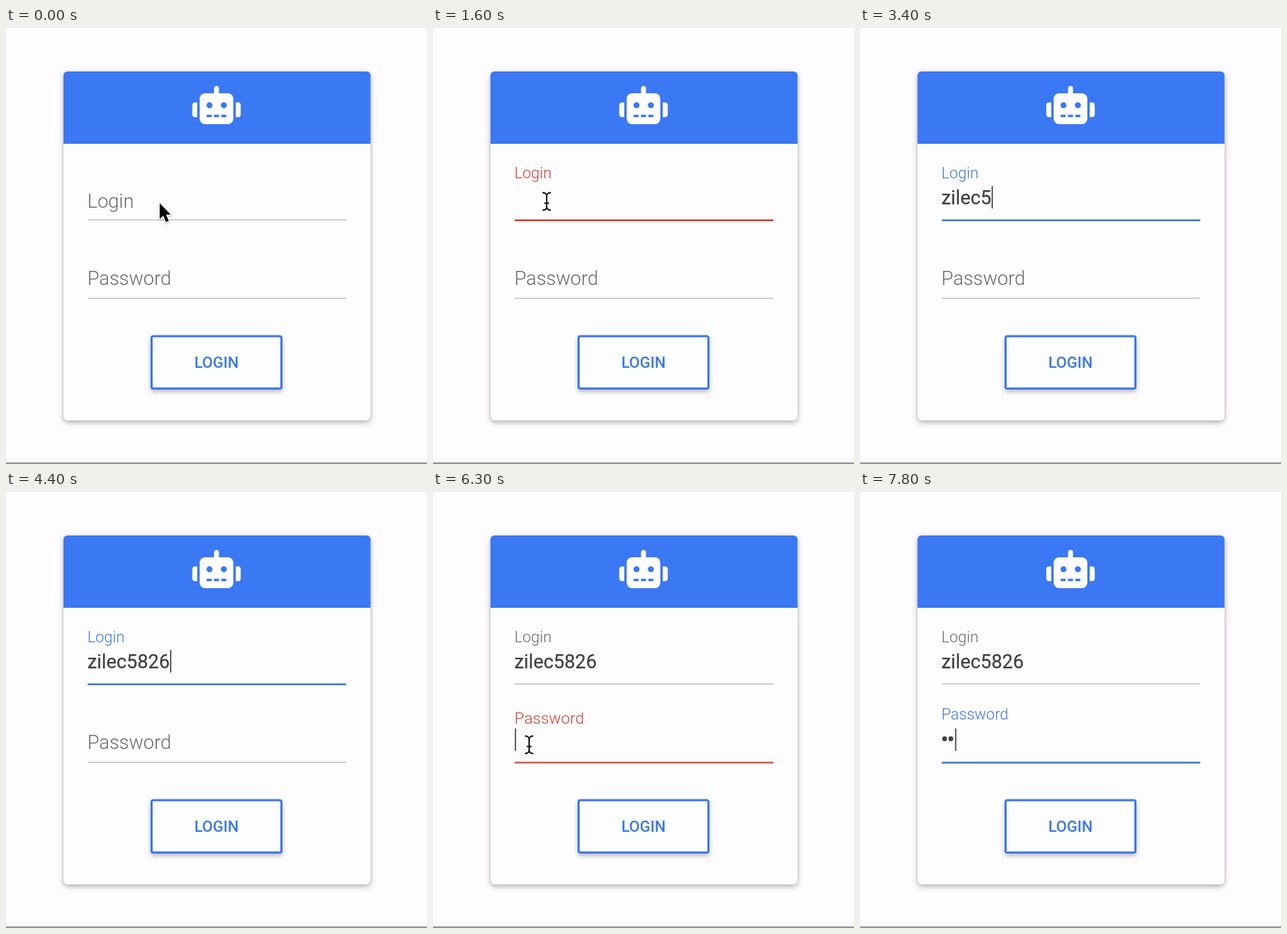
These frames come from a looping animation (600 px wide and 621 px high, 8 s). An HTML page:

```html
<!DOCTYPE html>
<html lang="en">
<head>
<meta charset="utf-8">
<title>Login form</title>
<style>
  html, body { margin: 0; width: 100%; height: 100%; overflow: hidden; background: #fefcfe; }
  svg { display: block; width: 600px; height: 621px; font-family: Roboto, sans-serif; }
  .card { fill: #fefdfe; filter: drop-shadow(0 3px 4px rgba(0, 0, 0, .25)) drop-shadow(0 0 1.5px rgba(0, 0, 0, .16)); }
  .blue { fill: #3b78f4; }
  .white { fill: #fefefe; }
  .button { fill: #fefdfe; stroke: #3b78f0; stroke-width: 3; filter: drop-shadow(0 3px 3px rgba(0, 0, 0, .28)); }
  .action { font-size: 22px; font-weight: 500; fill: #3b78e7; text-anchor: middle; }
  .label { font-size: 27.4px; font-weight: 300; }
  .value { font-size: 27.4px; font-weight: 400; fill: #3f4044; stroke: #3f4044; stroke-width: .25; }
  .caret { fill: #303036; }
  .squiggle { stroke: #e5463c; stroke-width: 4; stroke-linecap: round; stroke-dasharray: 0 4.9; }
  .outline { fill: none; stroke: #fff; stroke-linejoin: round; stroke-linecap: round; }
</style>
</head>
<body>
<svg viewBox="0 0 600 621">
  <defs>
    <path id="arrowShape" d="M0 0v22.5l5-4.8 4 9.3 4-1.7-4-9h6.8z"/>
    <path id="beamShape" d="M-6-12.5q5 0 6 4q1-4 6-4M0-9V9M-6 12.5q5 0 6-4q1 4 6 4M-3.5 2.5h7"/>
  </defs>

  <rect class="card" x="82" y="62" width="437.5" height="497" rx="6"/>
  <path class="blue" d="M82 164.500V68q0-6 6-6h425.500q6 0 6 6v96.500z"/>
  <rect x="82" y="163.300" width="437.500" height="1.400" fill="#346bdc"/>

  <g class="white">
    <rect x="276" y="93" width="48" height="44" rx="8"/>
    <rect x="296.500" y="82.500" width="7" height="16" rx="3.500"/>
    <path d="M272.500 106v21h-3q-4 0-4-4v-13q0-4 4-4z"/>
    <path d="M327.500 106v21h3q4 0 4-4v-13q0-4-4-4z"/>
  </g>
  <g class="blue">
    <circle cx="290" cy="110" r="4.300"/>
    <circle cx="310.500" cy="110" r="4.300"/>
    <path d="M286 123.500h7v3.500h-7zM296.500 123.500h7v3.500h-7zM307 123.500h7v3.500h-7z"/>
  </g>

  <rect id="loginLine" x="116.500" width="368.500"/>
  <rect id="passLine" x="116.500" width="368.500"/>
  <text id="loginLabel" class="label">Login</text>
  <text id="passLabel" class="label">Password</text>
  <text id="user" class="value" x="116" y="250.500"></text>
  <path id="squiggle" class="squiggle" d="M118.500 254.800H232"/>
  <g id="dots" fill="#3f4044">
    <circle cx="120.600" cy="351.500" r="3.400"/>
    <circle cx="129.500" cy="351.500" r="3.400"/>
  </g>
  <rect id="caret" class="caret" width="1.600" height="32"/>

  <rect class="button" x="207.500" y="439" width="185" height="74.500" rx="2.500"/>
  <text class="action" x="300" y="484">LOGIN</text>
  <rect y="619" width="600" height="1.500" fill="#69696c"/>

  <g id="arrow">
    <use href="#arrowShape" class="outline" stroke-width="3" style="filter: drop-shadow(0 1px 1px rgba(0,0,0,.3))"/>
    <use href="#arrowShape"/>
  </g>
  <g id="beam">
    <use href="#beamShape" class="outline" stroke-width="4.500"/>
    <use href="#beamShape" fill="none" stroke="#111" stroke-width="2"/>
  </g>
</svg>
<script>
  const LOOP = 8000, STEP = 100, FLOAT = 400, BLINK = 500;
  const NAME = "zilec5826";
  const NAME_KEYS = [1900, 2100, 2400, 2600, 3000, 3400, 3500, 3700, 4400];
  const DOT_KEYS = [6900, 7500];
  const SWITCH = 6100;
  const CARET_RESETS = [1100, ...NAME_KEYS, SWITCH, ...DOT_KEYS];

  const TEXT_GREY = [104, 104, 108], LINE_GREY = [186, 194, 202];
  const RED = [217, 57, 45], BLUE = [60, 120, 224];

  const fields = [
    { label: "loginLabel", line: "loginLine", focus: 1072, valid: 1900, blur: SWITCH, rest: 256, top: 213.5, lineY: 272.6 },
    { label: "passLabel", line: "passLine", focus: 6160, valid: 6900, blur: Infinity, rest: 365.7, top: 323.5, lineY: 384.2 }
  ];

  const $ = id => document.getElementById(id);
  const lerp = (a, b, p) => a + (b - a) * p;
  const clamp = x => Math.min(1, Math.max(0, x));
  const mix = (a, b, p) => a.map((v, i) => lerp(v, b[i], p));
  const rgb = c => `rgb(${c.map(Math.round)})`;
  const show = (id, on) => $(id).style.display = on ? "" : "none";
  const pressed = (keys, t) => keys.filter(k => k <= t).length;

  // cubic-bezier(.25, .8, .25, 1)
  function ease(x) {
    if (x <= 0) return 0;
    if (x >= 1) return 1;
    const curve = (u, a, b) => 3 * (1 - u) ** 2 * u * a + 3 * (1 - u) * u * u * b + u ** 3;
    let lo = 0, hi = 1;
    for (let i = 0; i < 24; i++) {
      const mid = (lo + hi) / 2;
      if (curve(mid, .25, .25) < x) lo = mid; else hi = mid;
    }
    return curve(lo, .8, 1);
  }

  const smooth = x => x * x * (3 - 2 * x);

  function drawField(f, t) {
    const since = start => ease((t - start) / FLOAT);
    const focus = since(f.focus), valid = since(f.valid), blur = since(f.blur);
    const tint = grey => rgb(mix(mix(mix(grey, RED, focus), BLUE, valid), grey, blur));
    const label = $(f.label), line = $(f.line);
    label.setAttribute("transform", `translate(116 ${lerp(f.rest, f.top, focus)}) scale(${lerp(1, .8, focus)})`);
    label.setAttribute("fill", tint(TEXT_GREY));
    line.setAttribute("y", f.lineY);
    line.setAttribute("height", 1.5 + 1.1 * focus * (1 - blur));
    line.setAttribute("fill", tint(LINE_GREY));
  }

  function drawCaret(t, typed, dots) {
    const last = CARET_RESETS.filter(k => k <= t).pop();
    show("caret", last !== undefined && Math.floor((t - last) / BLINK) % 2 === 0);
    const inPassword = t >= SWITCH;
    let x = 116.7;
    if (inPassword && dots) x = 117 + dots * 9.3;
    if (!inPassword && typed) x = 116.5 + $("user").getComputedTextLength();
    $("caret").setAttribute("x", x);
    $("caret").setAttribute("y", inPassword ? 336.8 : typed ? 225 : 226.5);
  }

  function drawPointer(t) {
    let x = 219, y = 249.5, kind = "arrow";
    if (t >= 500) {
      const p = smooth(clamp((t - 400) / 500));
      x = lerp(219, 162, p);
      y = lerp(252, 247, p);
      kind = "beam";
    }
    if (t >= 4900) {
      const p = smooth(clamp((t - 4800) / 800));
      x = lerp(162, 137, p);
      y = lerp(247, 360, p);
      kind = y > 275 && y < 335 ? "arrow" : "beam";
    }
    const hidden = (t >= NAME_KEYS[0] && t < 4900) || t >= DOT_KEYS[0];
    for (const id of ["arrow", "beam"]) {
      show(id, !hidden && id === kind);
      $(id).setAttribute("transform", `translate(${x} ${y})`);
    }
  }

  function draw(t) {
    const typed = pressed(NAME_KEYS, t), dots = pressed(DOT_KEYS, t);
    fields.forEach(f => drawField(f, t));
    $("user").textContent = NAME.slice(0, typed);
    show("squiggle", t >= 4900 && t < SWITCH);
    [...$("dots").children].forEach((dot, i) => dot.style.display = i < dots ? "" : "none");
    drawCaret(t, typed, dots);
    drawPointer(t);
  }

  const start = performance.now();
  function tick() {
    const t = Math.max(0, performance.now() - start) % LOOP;
    draw(Math.floor(t / STEP) * STEP);
    requestAnimationFrame(tick);
  }
  tick();
</script>
</body>
</html>
```
